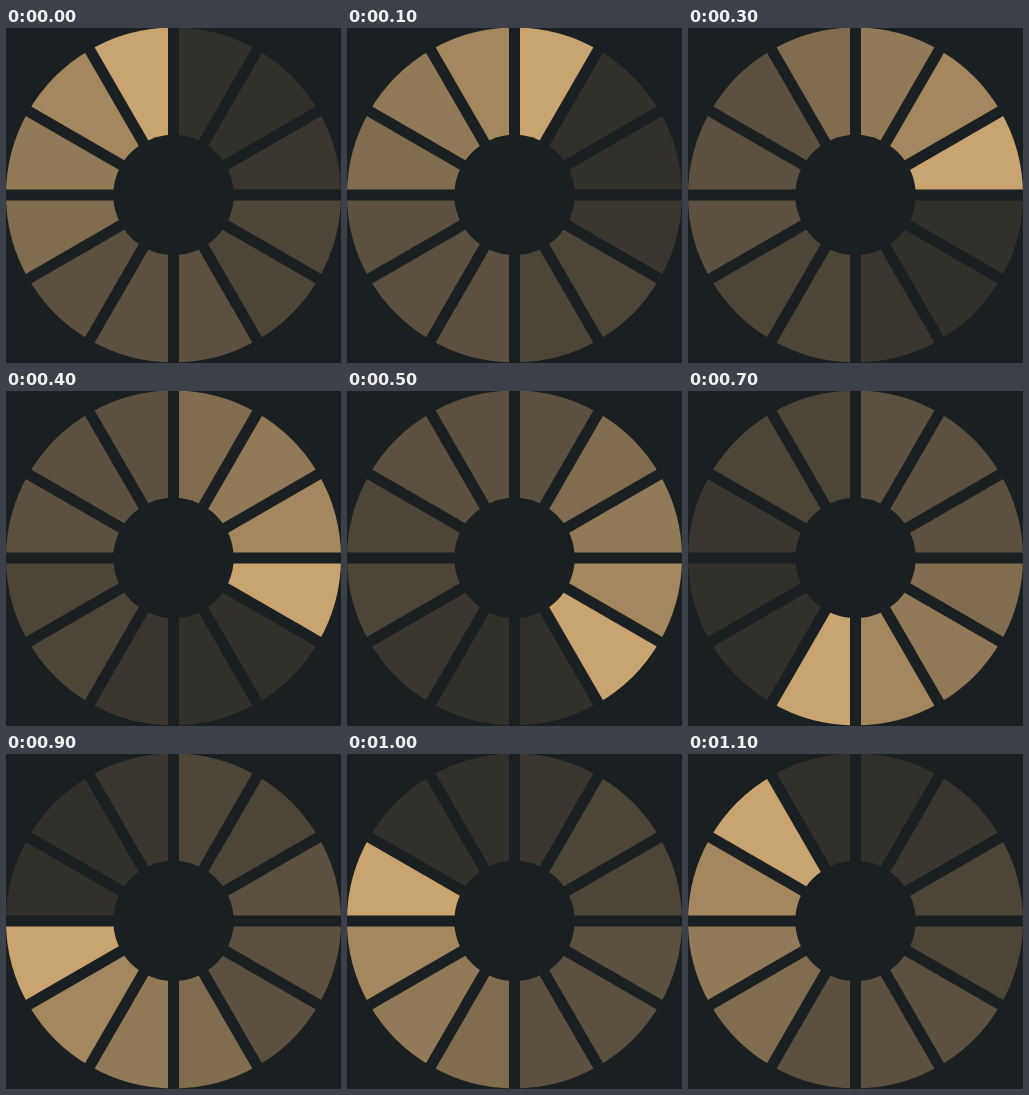
An HTML page that plays this animation: 335x335 px, repeating every 1200 ms.

```html
<!DOCTYPE html>
<html lang="en">
<head>
<meta charset="utf-8">
<title>Spinner</title>
<style>
  html, body { margin: 0; width: 100%; height: 100%; overflow: hidden; background: #1a1f21; }
  svg { display: block; width: 335px; height: 335px; }
  .wedge { animation: fade 1200ms step-end infinite; }
  .spoke { stroke: #1a1f21; stroke-width: 11; }
  .hub { fill: #1a1f21; }

  @keyframes fade {
    0% { fill: #c8a470; }
    8.333% { fill: #a2875f; }
    16.666% { fill: #907a58; }
    25% { fill: #806c4e; }
    33.333% { fill: #5c5140; }
    58.333% { fill: #4d4538; }
    75% { fill: #3b3730; }
    83.333%, 100% { fill: #32302b; }
  }
</style>
</head>
<body>
<svg viewBox="0 0 335 335">
  <g id="wheel" transform="translate(167.5 167)"></g>
</svg>
<script>
  const COUNT = 12, STEP = 100, RADIUS = 167.5, HUB = 60.2;
  const wheel = document.getElementById('wheel');

  function add(tag, attrs) {
    const el = document.createElementNS('http://www.w3.org/2000/svg', tag);
    for (const name in attrs) el.setAttribute(name, attrs[name]);
    wheel.append(el);
    return el;
  }

  const angle = 2 * Math.PI / COUNT;
  const x = RADIUS * Math.sin(angle), y = -RADIUS * Math.cos(angle);
  const d = `M0 0V${-RADIUS}A${RADIUS} ${RADIUS} 0 0 1 ${x} ${y}Z`;
  const turn = i => `rotate(${i * 360 / COUNT})`;

  // Wedges run clockwise from the top; the last one is lit first.
  for (let i = 0; i < COUNT; i++) {
    const wedge = add('path', { class: 'wedge', d, transform: turn(i) });
    wedge.style.animationDelay = `${(i + 1 - COUNT) * STEP}ms`;
  }
  for (let i = 0; i < COUNT / 2; i++) {
    add('line', { class: 'spoke', y1: -RADIUS - 2, y2: RADIUS + 2, transform: turn(i) });
  }
  add('circle', { class: 'hub', r: HUB });
</script>
</body>
</html>
```
